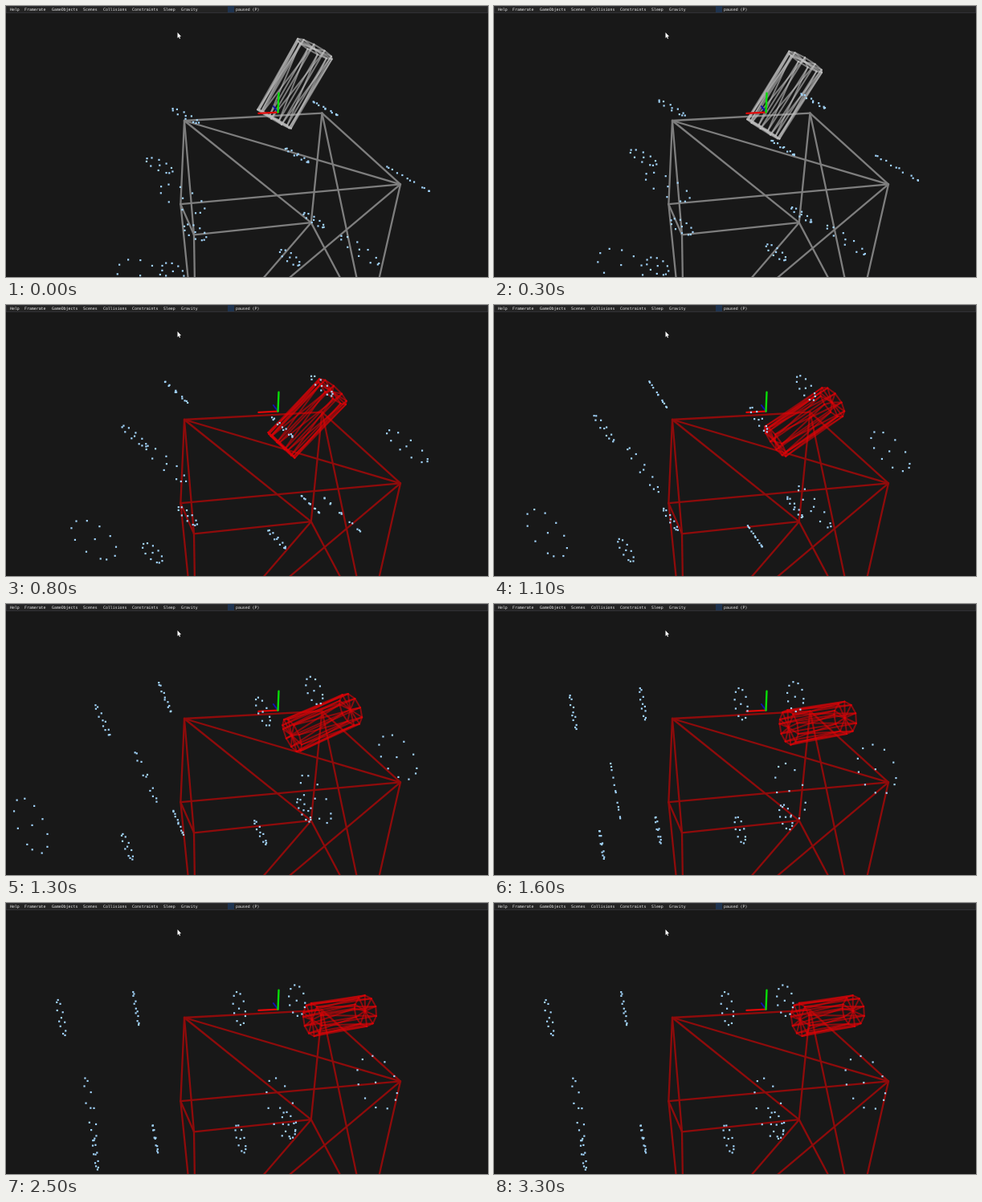
Write an HTML page with a canvas that moves like this. It is 600 by 338 pixels and loops after 3.4 s.

```html
<!DOCTYPE html>
<html lang="en">
<head>
<meta charset="utf-8">
<title>Collision test</title>
<style>
  html, body { margin: 0; width: 100%; height: 100%; overflow: hidden; background: #181818; }
  canvas { position: absolute; left: 0; top: 0; }
  nav {
    position: absolute; left: 0; top: 0; width: 600px; height: 9px;
    background: #242424; color: #ececec; box-shadow: inset 0 0 0 1px #303034;
    font: 4.9px/8px "DejaVu Sans Mono", "Noto Sans Mono", monospace;
  }
  nav span { position: absolute; top: 0; white-space: pre; }
  nav i { position: absolute; left: 276px; top: 0; width: 8px; height: 8px; background: #1f3450; }
</style>
</head>
<body>
<canvas id="stage" width="600" height="338"></canvas>
<nav>
  <span style="left:5px">Help</span>
  <span style="left:23px">Framerate</span>
  <span style="left:57px">GameObjects</span>
  <span style="left:96px">Scenes</span>
  <span style="left:121px">Collisions</span>
  <span style="left:157px">Constraints</span>
  <span style="left:196px">Sleep</span>
  <span style="left:218px">Gravity</span>
  <i></i>
  <span style="left:286px">paused (P)</span>
</nav>
<script>
const ctx = document.getElementById('stage').getContext('2d');
const { sin, cos, min, max, hypot, PI } = Math;
const LOOP = 3400, STEP = 100;
const FOCAL = 408, SIZE = 10, HALF = 2; // cube side, half cylinder length
const HIT = .5, FLAT = 1.5, REST = -1.57; // seconds of contact and lying flat; resting height

const rad = deg => deg * PI / 180;
const add = (a, b, k = 1) => a.map((c, i) => c + b[i] * k);
const sub = (a, b) => add(a, b, -1);
const unit = a => a.map(c => c / hypot(...a));
const cross = (a, b) => [
  a[1] * b[2] - a[2] * b[1],
  a[2] * b[0] - a[0] * b[2],
  a[0] * b[1] - a[1] * b[0]
];

// World axes in camera space (x right, y down, z forward)
const pitch = rad(24.4), yaw = rad(9);
const right = [cos(yaw), -sin(yaw) * sin(pitch), sin(yaw) * cos(pitch)];
const up = [0, -cos(pitch), -sin(pitch)];
const away = [-sin(yaw), -cos(yaw) * sin(pitch), cos(yaw) * cos(pitch)];
const origin = [1.567, -1.48, 16.6];
const farLeft = [-4.346, -1.448, 22.73];

const place = (from, r, u, a) => add(add(add(from, right, r), up, u), away, a);
const project = ([x, y, z]) => [300 + FOCAL * x / z, 169 + FOCAL * y / z];
const ease = x => (1 - cos(PI * min(1, max(0, x)))) / 2;

// Corners in order: far left, far right, near right, near left; top, then bottom
const cube = [0, 1].flatMap(low => [[0, 0], [1, 0], [1, 1], [0, 1]].map(([r, n]) =>
  place(farLeft, r * SIZE, -low * SIZE, -n * SIZE)));
const cubeEdges = '01 12 23 30 45 56 67 74 04 15 26 37 02 05 34 16 27 57'
  .split(' ').map(e => [cube[e[0]], cube[e[1]]]);

// Rim vertices every 0.6 rad, which leaves one short gap
const rimAngles = Array.from({ length: 11 }, (_, i) => .14 + i * .6);

function rim(centre, axis) {
  const side = unit(cross(axis, sub(away, right)));
  const front = cross(side, axis);
  return rimAngles.map(a => add(add(centre, front, cos(a)), side, sin(a)));
}

// The cylinder drops on the cube, tips over and slides to a stop
function cylinder(s) {
  const tilt = rad(58) * max(0, 1 - (s / FLAT) ** 2), heading = rad(14);
  const fall = 1.275 - 6.7 * s * s;
  const settle = REST + 1.18 * max(0, FLAT - s);
  const centre = place(origin,
    .9 + 3.75 * ease(s / 2.45),
    max(fall, settle),
    .46 + 2.24 * ease((s - .35) / 2.25));
  const axis = place([0, 0, 0], cos(tilt) * cos(heading), sin(tilt), cos(tilt) * sin(heading));
  const ends = [-HALF, HALF].map(h => add(centre, axis, h));
  return { ends, rims: ends.map(e => rim(e, axis)) };
}

function cylinderEdges({ ends, rims }) {
  const n = rimAngles.length;
  return rimAngles.flatMap((_, i) => {
    const j = (i + 1) % n;
    return [
      [rims[0][i], rims[1][i]], [rims[0][i], rims[1][j]],
      ...rims.flatMap((r, k) => [[r[i], r[j]], [ends[k], r[i]]])
    ];
  });
}

function lines(edges, color, width) {
  ctx.strokeStyle = color;
  ctx.lineWidth = width;
  for (const [a, b] of edges) {
    ctx.beginPath();
    ctx.moveTo(...project(a));
    ctx.lineTo(...project(b));
    ctx.stroke();
  }
}

function gizmo() {
  lines([[origin, add(origin, away)]], '#1212b0', 2);
  lines([[origin, add(origin, right, -1)]], '#e00808', 2.2);
  lines([[origin, add(origin, up)]], '#08dc08', 2.4);
}

function pointer() {
  ctx.fillStyle = '#fff';
  ctx.fill(new Path2D('M213.5 33v7l1.5-1.4 1 2.4 1-.5-.9-2.3 1.9-.2z'));
}

// Difference of the two shapes: each cube corner minus each cylinder vertex
function differenceDots({ ends, rims }) {
  ctx.fillStyle = '#a2d4fa';
  for (const v of cube) {
    for (const p of [...ends, ...rims.flat()]) {
      const [x, y] = project(sub(v, sub(p, origin)));
      ctx.fillRect(x - 1.1, y - 1.1, 2.2, 2.2);
    }
  }
}

function draw(s) {
  const body = cylinder(s), hit = s >= HIT;
  ctx.fillStyle = '#181818';
  ctx.fillRect(0, 0, 600, 338);
  ctx.lineCap = 'round';
  lines(cubeEdges, hit ? '#8f0b0b' : '#7e7e7e', 2.3);
  lines(cylinderEdges(body), hit ? 'rgba(220,4,8,.58)' : 'rgba(190,190,190,.6)', 2);
  gizmo();
  differenceDots(body);
  pointer();
}

function tick() {
  const t = performance.now() % LOOP;
  draw(Math.floor(t / STEP) * STEP / 1000);
  requestAnimationFrame(tick);
}
tick();
</script>
</body>
</html>
```
